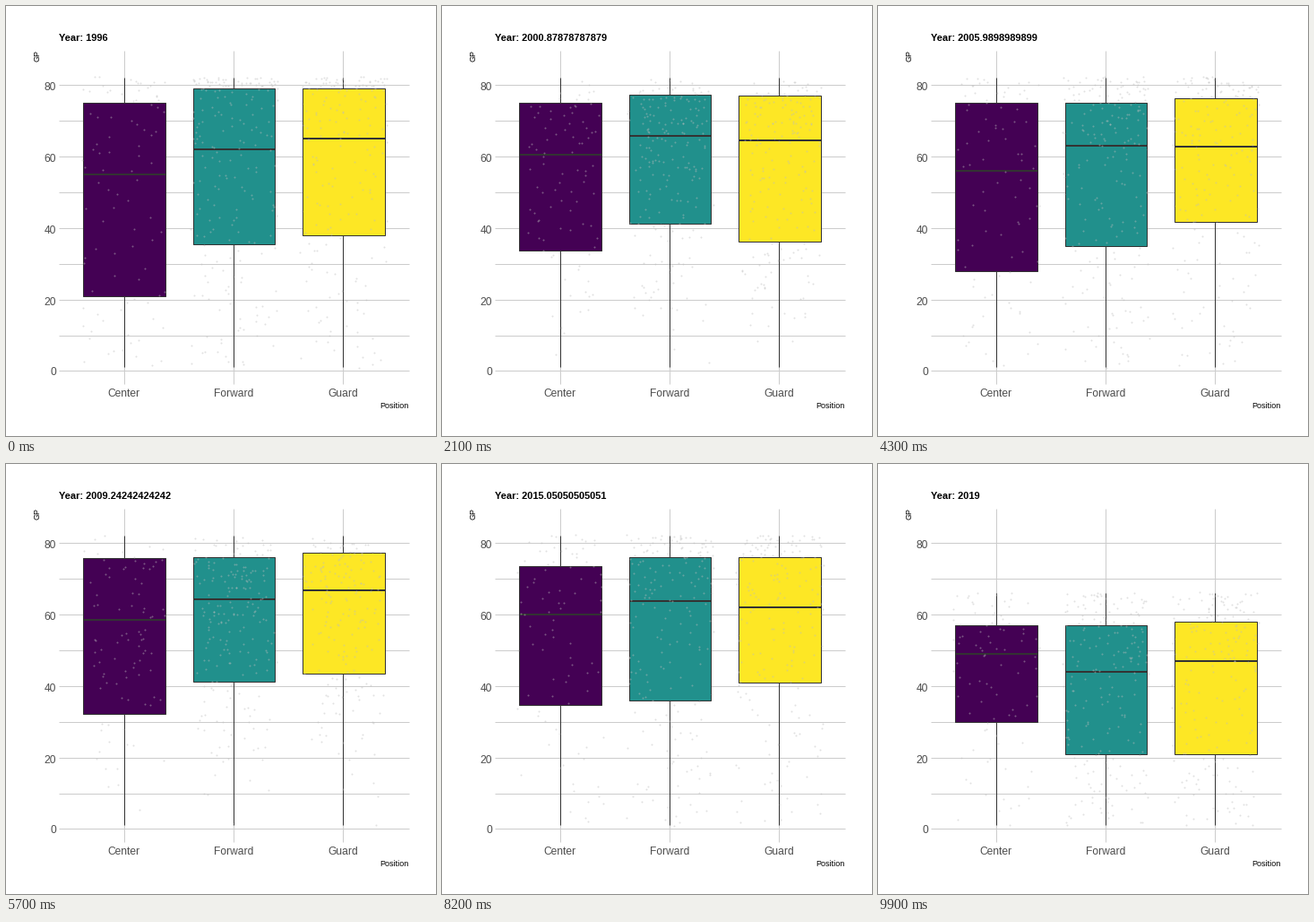
Recreate the animation shown at these times as a matplotlib script. Size 480 by 480 pixels, loop 10 s.

```python
import numpy as np
import matplotlib.pyplot as plt
from matplotlib.animation import FuncAnimation
from matplotlib.patches import Rectangle

FRAMES, INTERVAL = 100, 100
FIRST, LAST = 1996, 2019
LABELS = ["Center", "Forward", "Guard"]
FILLS = ["#440154", "#21908c", "#fde725"]
COUNTS = [90, 200, 185]
INK, GRID, TICK = "#333333", "#cccccc", "#4d4d4d"

FULL_SEASON = 82
SHORT_SEASONS = {1998: 50, 2011: 66, 2019: 66}

# Key points of the quartiles per position, in games of a full season
TREND = {
    1996: [21, 55, 75, 35.5, 62, 79, 38, 65, 79],
    2001: [34.1, 60.8, 75, 41.4, 65.8, 77.3, 36.1, 64.6, 77],
    2006: [28, 56, 75, 35, 63, 75, 41.8, 62.7, 76.3],
    2009: [32.2, 58.3, 75.7, 41.7, 64.8, 76, 43.8, 67.3, 77.5],
    2012: [31, 60.5, 76.6, 34.9, 59, 76.6, 39.5, 61.5, 76.3],
    2015: [34.8, 60, 73.6, 36, 63.8, 76, 41, 62, 76],
    2019: [37.3, 60.9, 70.8, 26.1, 54.7, 70.8, 26.1, 58.4, 72.1],
}

years = np.arange(FIRST, LAST + 1)
key_frames = np.round((years - FIRST) * (FRAMES - 1) / (LAST - FIRST))


def x_px(pos):
    return 59 + (pos + 0.6) * 122.2


def y_px(value):
    return 407.9 - 3.99 * value


def build_stats():
    """Five-number summaries, shape (year, position, 5)."""
    length = np.array([SHORT_SEASONS.get(y, FULL_SEASON) for y in years])
    curves = np.array([np.interp(years, list(TREND), curve)
                       for curve in zip(*TREND.values())])
    quartiles = (curves * length / FULL_SEASON).T.reshape(-1, 3, 3)
    stats = np.ones((len(years), 3, 5))
    stats[:, :, 1:4] = quartiles
    stats[:, :, 4] = length[:, None]
    return stats


def build_points(stats):
    """Jittered samples that follow the summaries, shape (year, point, 2)."""
    rng = np.random.default_rng(7)
    seasons = []
    for row in stats:
        parts = []
        for p, n in enumerate(COUNTS):
            u = rng.permutation((np.arange(n) + rng.random(n)) / n)
            u = np.where(u > 0.75, 1 - 0.25 * ((1 - u) * 4) ** 1.4, u)
            games = np.round(np.interp(u, np.linspace(0, 1, 5), row[p]))
            x = x_px(p + rng.uniform(-0.4, 0.4, n))
            y = y_px(games + rng.uniform(-0.4, 0.4, n))
            parts.append(np.column_stack([x, y]))
        seasons.append(np.vstack(parts))
    return np.array(seasons)


def tween(states, frame):
    k = min(np.searchsorted(key_frames, frame, side="right") - 1, len(years) - 2)
    t = (frame - key_frames[k]) / (key_frames[k + 1] - key_frames[k])
    return states[k] * (1 - t) + states[k + 1] * t


stats = build_stats()
points = build_points(stats)

plt.rcParams["font.family"] = "Liberation Sans"
fig = plt.figure(figsize=(480 / 72, 480 / 72), dpi=72, facecolor="white")
ax = fig.add_axes([0, 0, 1, 1])
ax.set(xlim=(0, 480), ylim=(480, 0))
ax.axis("off")


def line(xs, ys, color=INK, width=1, z=1):
    # Whole-number coordinates snap to the pixel that starts there
    return ax.plot(xs, ys, color=color, lw=width, zorder=z, snap=True,
                   solid_capstyle="butt")[0]


for value in range(0, 90, 10):
    y = np.floor(y_px(value))
    line([59, 450], [y, y], GRID)
    if value % 20 == 0:
        ax.text(56.3, y + 5.5, str(value), size=12, color=TICK, ha="right")

boxes = []
for p, (label, fill) in enumerate(zip(LABELS, FILLS)):
    mid = np.floor(x_px(p))
    line([mid, mid], [50, 422], GRID)
    ax.text(x_px(p) - 0.6, 436, label, size=12, color=TICK, ha="center")
    left, right = np.floor(x_px(p + np.array([-0.375, 0.375])) + 0.5)
    whisker = line([mid, mid], [0, 0], z=2)
    box = ax.add_patch(Rectangle((left, 0), right - left, 0, fc=fill, ec=INK,
                                 lw=1, zorder=3, joinstyle="miter", snap=True))
    median = line([left, right], [0, 0], width=2, z=4)
    boxes.append((whisker, box, median))

dots = ax.scatter(points[0, :, 0], points[0, :, 1], s=2.0 ** 2, c="#bebebe",
                  alpha=0.45, linewidths=0, zorder=5)
title = ax.text(59, 39, "", size=11, weight="bold")
ax.text(450, 449, "Position", size=9, ha="right")
ax.text(35, 56, "GP", size=9, rotation=90, ha="center", va="center")


def update(frame):
    year = FIRST + (LAST - FIRST) * frame / (FRAMES - 1)
    title.set_text(f"Year: {year:.15g}")
    for (whisker, box, median), row in zip(boxes, tween(stats, frame)):
        low, q1, mid, q3, high = np.floor(y_px(row))
        whisker.set_ydata([low, high])
        box.set_y(q3)
        box.set_height(q1 - q3)
        median.set_ydata([mid, mid])
    dots.set_offsets(tween(points, frame))
    return []


anim = FuncAnimation(fig, update, frames=FRAMES, interval=INTERVAL,
                     repeat=True, repeat_delay=0, blit=False)
plt.show()
```
